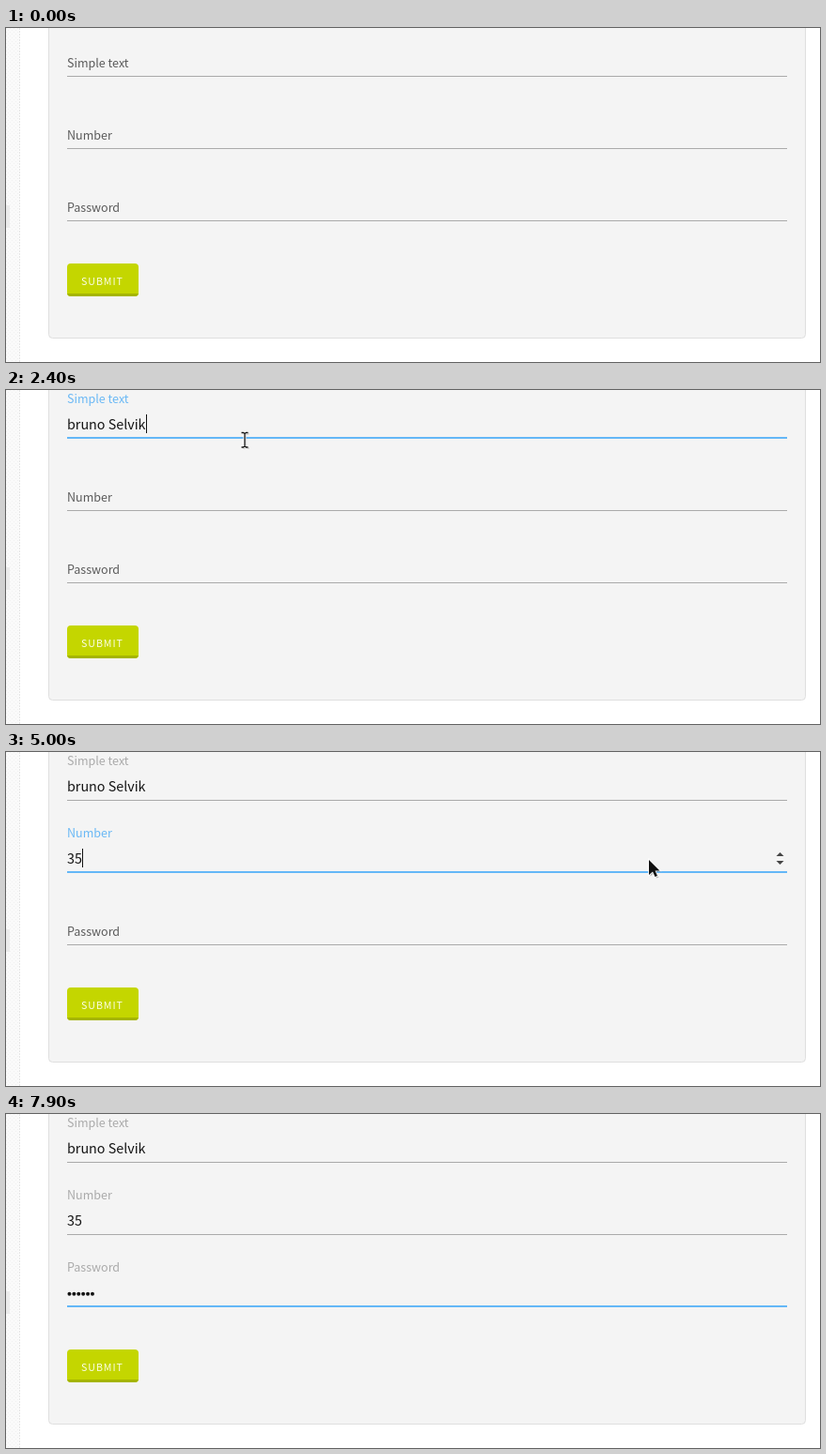
These frames come from a looping animation (866 by 356 pixels, 8 s). An HTML page:

```html
<!DOCTYPE html>
<html lang="en">
<head>
<meta charset="utf-8">
<title>Form with floating labels</title>
<style>
  html, body { margin: 0; width: 100%; height: 100%; overflow: hidden; background: #fff; }
  svg { display: block; width: 866px; height: 356px; }
  text { font-family: "Noto Sans CJK JP", "Noto Sans CJK SC", "Noto Sans CJK", "Open Sans", sans-serif; white-space: pre; }
  .label { font-size: 12.53px; }
  .value { font-size: 14.32px; fill: #141414; }
  .button { font-size: 10.7px; letter-spacing: .9px; fill: #fcfde6; }
</style>
</head>
<body>
<svg viewBox="0 0 866 356">
  <defs>
    <pattern id="dots" width="4" height="4" patternUnits="userSpaceOnUse">
      <rect width="4" height="4" fill="#fafafa"/>
      <path d="M0 0h1v1h-1zM2 2h1v1h-1z" fill="#f1f1f1"/>
    </pattern>
    <path id="stem" d="M-3.5 -7.5H-1.5L0 -6.5 1.5 -7.5H3.5M0 -6.5V7M-3.5 8H-1.5L0 7 1.5 8H3.5" fill="none"/>
    <path id="tip" d="M0 0V16L4 12.5 6.5 18 9 17 6.6 11.5H11.5Z"/>
    <clipPath id="face"><rect x="65" y="251" width="76" height="35" rx="4"/></clipPath>
  </defs>
  <rect width="866" height="356" fill="#fff"/>
  <rect width="14" height="356" fill="url(#dots)"/>
  <path d="M14.5 0V356" stroke="#e6e6e6" stroke-dasharray="2 1"/>
  <rect y="189" width="4" height="24" fill="#ececec"/>
  <rect x="45.5" y="-10.5" width="805" height="341" rx="4" fill="#f4f4f4" stroke="#dfdfdf"/>
  <g id="fields"></g>
  <g clip-path="url(#face)">
    <rect x="65" y="251" width="76" height="35" fill="#c4d600"/>
    <rect x="65" y="283" width="76" height="3" fill="#a5b500"/>
  </g>
  <text class="button" x="80" y="274">SUBMIT</text>
  <g id="spinner">
    <rect id="hover" x="816" y="103" width="15" height="10" fill="#cbcbcb"/>
    <path d="M819.5 111l4-4 4 4zM819.5 116h8l-4 4z" fill="#444"/>
  </g>
  <rect id="caret" width="1" height="20" fill="#111"/>
  <g id="beam">
    <use href="#stem" x="1" y="1" stroke="#000" stroke-opacity=".2" stroke-width="2"/>
    <use href="#stem" stroke="#fff" stroke-width="3"/>
    <use href="#stem" stroke="#111" stroke-width="1.3"/>
  </g>
  <g id="arrow">
    <use href="#tip" x="1.5" y="1.5" fill="#000" fill-opacity=".25"/>
    <use href="#tip" fill="#111" stroke="#fff" stroke-width="1.6" paint-order="stroke"/>
  </g>
</svg>
<script>
const LOOP = 8000, STEP = 100, FADE = 200, BLINK = 500, LEFT = 65, PITCH = 77, BULLET = 4.9;
const BLUE = [100, 183, 247], GREY = [170, 170, 170];
const $ = id => document.getElementById(id);

function set(el, attrs) {
  for (const k in attrs) el.setAttribute(k, attrs[k]);
}
function add(tag, parent, attrs) {
  const el = document.createElementNS("http://www.w3.org/2000/svg", tag);
  set(el, attrs);
  return parent.appendChild(el);
}
const show = (el, on) => set(el, { visibility: on ? "visible" : "hidden" });
const clamp = v => Math.max(0, Math.min(1, v));
const mix = (a, b, p) => a + (b - a) * p;
const easeOut = p => 1 - (1 - p) ** 2;

// blink: start of the caret clock; keys: first key time, gap: ms per key
const fields = [
  { name: "Simple text", text: "bruno Selvik", focus: 700, blur: 2500, blink: 700, keys: 1300, gap: 100 },
  { name: "Number", text: "35", focus: 2500, blur: 5600, blink: 3500, keys: 4700, gap: 200 },
  { name: "Password", text: "secret", focus: 5600, blur: 7900, blink: 6000, keys: 5900, gap: 100, masked: true }
];
fields.forEach((f, i) => {
  const g = add("g", $("fields"), { transform: `translate(0 ${i * PITCH})` });
  f.line = add("rect", g, { x: LEFT, width: 766 });
  f.label = add("text", g, { x: LEFT, class: "label" });
  f.label.textContent = f.name;
  f.value = add("text", g, { x: LEFT, y: 42, class: "value" });
  f.bullets = f.masked
    ? [...f.text].map((_, n) => add("circle", g, { cx: LEFT + BULLET * (n + .5), cy: 37.7, r: 2, fill: "#141414" }))
    : [];
});

// where the pointer turns: time, x, y
const turns = [
  [200, 640, 46], [500, 254, 53], [2700, 254, 53], [3000, 847, 108], [3700, 821, 119],
  [4300, 694, 116], [5000, 684, 115], [5400, 278, 211], [6500, 278, 211], [6800, 330, 217], [7500, 815, 76]
];

function drawPointer(t) {
  const n = turns.findIndex(s => s[0] >= t);
  const seen = n > 0 || t === turns[0][0];
  const beam = t < 3000 || (t > 5200 && t <= 6500);
  show($("beam"), seen && beam);
  show($("arrow"), seen && !beam);
  if (!seen) return;
  const b = turns[n], a = turns[Math.max(0, n - 1)];
  const p = clamp((t - a[0]) / (b[0] - a[0] || 1));
  const [x, y] = [1, 2].map(k => Math.round(mix(a[k], b[k], p)));
  set($(beam ? "beam" : "arrow"), { transform: `translate(${x} ${y})` });
}

function drawField(f, i, t) {
  const active = t >= f.focus && t < f.blur;
  const since = clamp((t - f.focus) / FADE);
  const glow = since - clamp((t - f.blur) / FADE);
  const tint = GREY.map((c, k) => Math.round(mix(c, BLUE[k], glow)));
  const height = 1 + glow;
  set(f.line, { y: 52 - height, height, fill: `rgb(${tint})` });
  set(f.label, {
    y: mix(42, 14, easeOut(since)),
    fill: active ? "#6ab8f5" : t < f.focus ? "#5a5a5a" : "#aaa"
  });

  const count = Math.max(0, Math.min(f.text.length, Math.floor((t - f.keys) / f.gap) + 1));
  f.value.textContent = f.masked ? "" : f.text.slice(0, count);
  f.bullets.forEach((b, n) => show(b, n < count));
  if (!active) return;

  const width = f.masked ? count * BULLET : count && f.value.getComputedTextLength();
  const typing = t >= f.keys && t < f.keys + f.text.length * f.gap;
  const lit = t >= f.blink && (t - f.blink) % (2 * BLINK) < BLINK;
  set($("caret"), { x: Math.round(LEFT + width), y: 26 + i * PITCH });
  show($("caret"), typing || lit);
}

function draw(ms) {
  const t = Math.floor((ms % LOOP) / STEP) * STEP;
  show($("caret"), false);
  fields.forEach((f, i) => drawField(f, i, t));
  show($("spinner"), t >= fields[1].focus && t < fields[1].blur);
  show($("hover"), t >= 3400 && t < 3900);
  // a hidden group does not hide a visible child
  if (t < fields[1].focus || t >= fields[1].blur) show($("hover"), false);
  drawPointer(t);
}

const began = performance.now();
function tick() {
  draw(performance.now() - began);
  requestAnimationFrame(tick);
}
tick();
</script>
</body>
</html>
```
